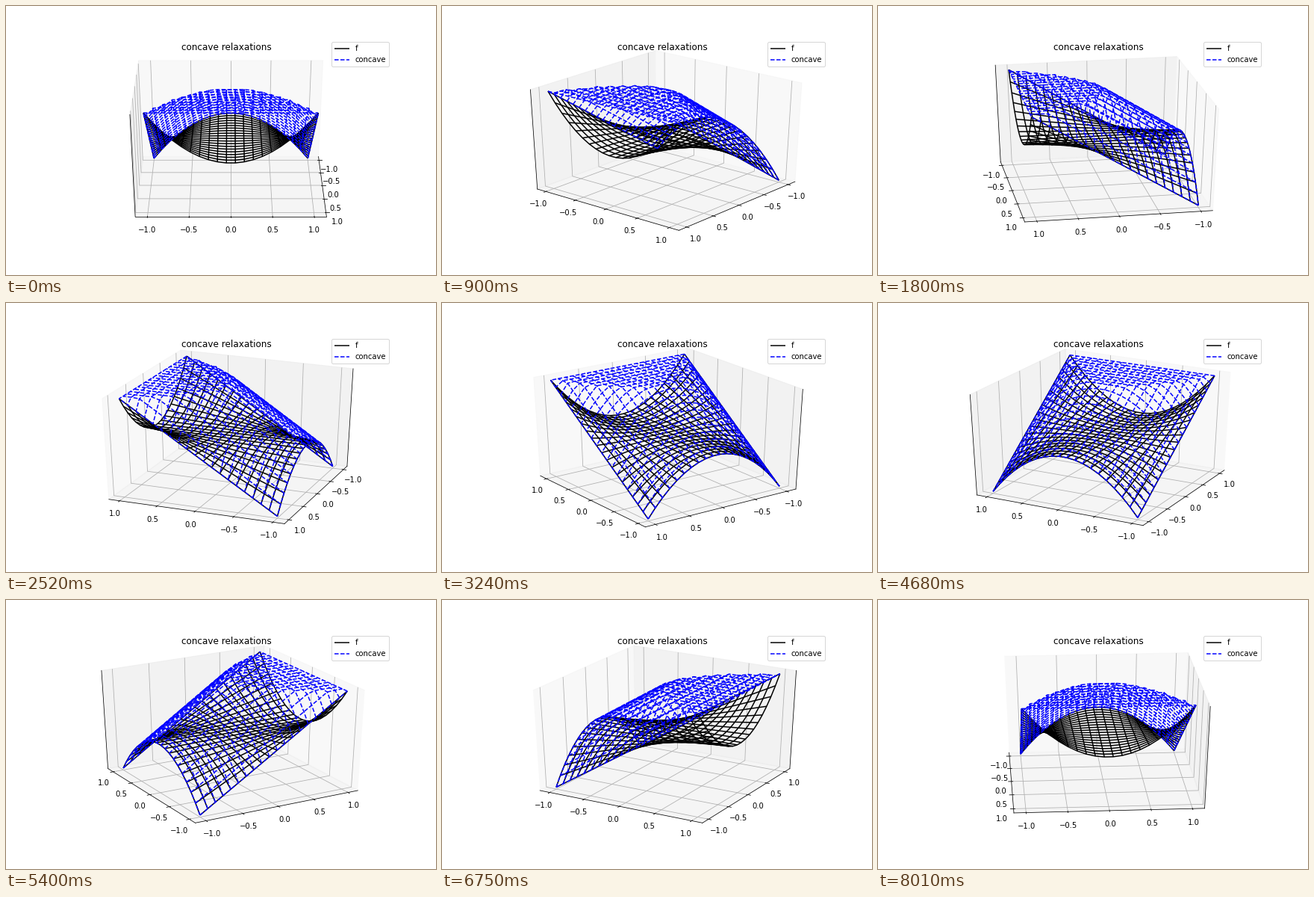
Recreate the animation shown at these times as a matplotlib script. Size 576 by 360 pixels, loop 8.1 s.

```python
import numpy as np
import matplotlib.pyplot as plt
from matplotlib.animation import FuncAnimation
from matplotlib.collections import LineCollection
from matplotlib.patches import Polygon

FRAMES, INTERVAL = 90, 90
ELEV = np.radians(30)
DIST = 10               # camera distance in box widths
EDGE = 0.5 + 1 / 48     # half size of the drawn box
STEP = 1 / 12           # unit for tick lengths
PAD = 11.5 * 48 / 718.2 * STEP
TICKS = np.linspace(-1, 1, 5)
SCALE = np.array([2.2, 2.2, 2])
SIDE = [1, 0, 0]        # direction in which each axis moves to the near side
PANES = ["0.95", "0.9", "0.925"]

fig = plt.figure(figsize=(8, 5), dpi=72, facecolor="white")
ax = fig.add_axes([0.125, 0.125, 0.775, 0.755])
ax.set_xlim(-0.095, 0.09)
ax.set_ylim(-0.095, 0.09)
ax.axis("off")
ax.set_title("concave relaxations", y=0.92, fontsize=12, pad=6)


def camera(azim):
    c, s = np.cos(azim), np.sin(azim)
    ce, se = np.cos(ELEV), np.sin(ELEV)
    toward = np.array([c * ce, s * ce, se])
    screen = np.array([[-s, c, 0], [-c * se, -s * se, ce]])
    return toward, screen


def project(points, view):
    toward, screen = view
    points = np.asarray(points)
    depth = DIST - points @ toward
    return points @ screen.T / depth[..., None]


def moved(point, k, value):
    out = point.copy()
    out[k] = value
    return out


def wire(x, y, z):
    mesh = np.stack([x, y, z], axis=-1) / SCALE
    return np.concatenate([mesh, mesh.swapaxes(0, 1)])


def add_lines(color, width, **style):
    lines = LineCollection([], colors=color, linewidths=width, clip_on=False, **style)
    return ax.add_collection(lines, autolim=False)


def add_line(width):
    return ax.plot([], [], color="black", lw=width, zorder=1, clip_on=False)[0]


panes = [ax.add_patch(Polygon(np.zeros((4, 2)), closed=False, fc=shade, ec=shade,
                              alpha=0.5, lw=1, zorder=0, clip_on=False))
         for shade in PANES]

spines, grids, ticks, labels = [], [], [], []
for k in range(3):
    spines.append(add_line(0.75))
    if k < 2:
        grids.append(add_lines("#b0b0b0", 0.8, zorder=1))
        ticks.append([add_line(0.8) for _ in TICKS])
        labels.append([ax.text(0, 0, f"{v:.1f}".replace("-", "\u2212"), fontsize=10,
                               ha="center", va="top", zorder=1) for v in TICKS])

x, y = np.meshgrid(np.linspace(-1, 1, 20), np.linspace(-1, 1, 20))
surfaces = [wire(x, y, x * y**2),
            wire(x, y, np.minimum(1, x + 1 - y**2))]
wires = [add_lines("black", 1.5, label="f", zorder=2),
         add_lines("blue", 1.5, linestyles="--", label="concave", zorder=2)]
ax.legend(loc="upper right", fontsize=10)


def draw_pane(k, far, view):
    a, b = [j for j in range(3) if j != k]
    corners = np.tile(far, (4, 1))
    corners[:, a] = [-EDGE, EDGE, EDGE, -EDGE]
    corners[:, b] = [-EDGE, -EDGE, EDGE, EDGE]
    panes[k].set_xy(project(corners, view))


def draw_axis(k, far, view):
    side = SIDE[k]
    start = moved(far, side, -far[side])
    end = moved(start, k, -start[k])
    spines[k].set_data(*project([start, end], view).T)
    if k == 2:
        return

    lines = []
    sign = np.sign(far[side])
    for v, tick, label in zip(TICKS / SCALE[k], ticks[k], labels[k]):
        root = moved(far, k, v)
        a, b = [j for j in range(3) if j != k]
        lines.append(project([moved(root, a, -far[a]), root, moved(root, b, -far[b])], view))

        foot = moved(start, k, v)
        inner = moved(foot, side, foot[side] + 0.1 * sign * STEP)
        outer = moved(foot, side, foot[side] - 0.2 * sign * STEP)
        tick.set_data(*project([inner, outer], view).T)
        label.set_position(project(moved(start + PAD * np.sign(start), k, v), view))
    grids[k].set_segments(lines)


def update(i):
    view = camera(2 * np.pi * i / FRAMES)
    far = np.where(view[0] < -1e-9, EDGE, -EDGE)
    for k in range(3):
        draw_pane(k, far, view)
        draw_axis(k, far, view)
    for lines, surface in zip(wires, surfaces):
        lines.set_segments(project(surface, view))
    return wires


anim = FuncAnimation(fig, update, frames=FRAMES, interval=INTERVAL,
                     init_func=lambda: update(0), repeat=True)
plt.show()
```
